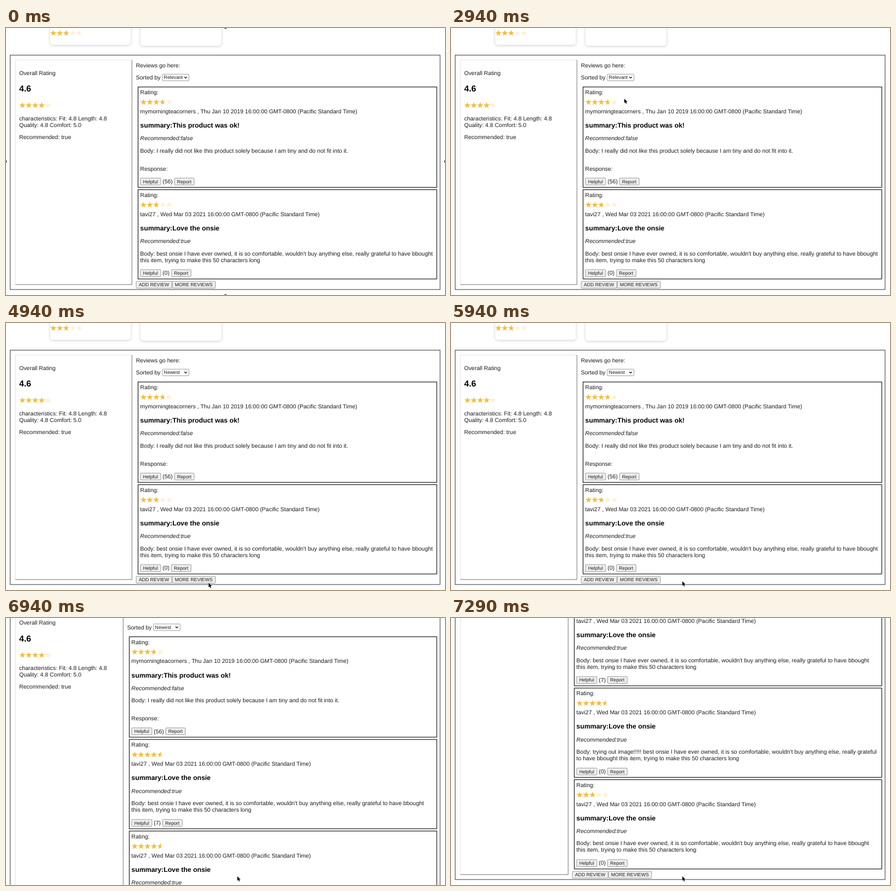
Write an HTML page that moves like this. It is 800x488 px and loops after 8000 ms.

```html
<!DOCTYPE html>
<html lang="en">
<head>
<meta charset="utf-8">
<style>
  html, body { margin: 0; width: 100%; height: 100%; overflow: hidden; background: #fff; }
  svg { display: block; font: 10.46px "Liberation Sans", Arial, sans-serif; fill: #1c1c1c; text-rendering: geometricPrecision; }
  .h2 { font-size: 15.72px; font-weight: bold; fill: #000; }
  .h3 { font-size: 12.25px; font-weight: bold; fill: #000; }
  .i { font-style: italic; }
  .ui { font-size: 8.73px; }
  .btn { fill: #efefef; stroke: #858585; stroke-width: .8; }
  .box { fill: none; stroke: #1c1c1c; stroke-width: 1.2; }
  .frame { fill: none; stroke: #333; stroke-width: 1; }
  .card { fill: #fff; filter: drop-shadow(0 1px 2.5px rgba(0, 0, 0, .2)); }
  .menu { fill: #f0f0f0; stroke: #c8c8c8; stroke-width: .6; filter: drop-shadow(0 2px 2px rgba(0, 0, 0, .25)); }
</style>
</head>
<body>
<svg id="stage" width="800" height="488" viewBox="0 0 800 488"></svg>
<script>
const stage = document.getElementById('stage');
const LOOP = 8000;
const LINE = 12, PARAGRAPH = 22.4, GAP = 4.2;   // vertical rhythm of the page
const STAR = 11.7, MENU_ROW = 15;

const POSTED = 'Wed Mar 03 2021 16:00:00 GMT-0800 (Pacific Standard Time)';
const PRAISE = 'best onsie I have ever owned, it is so comfortable, wouldn\'t buy anything else, really grateful';
const ENDING = 'this item, trying to make this 50 characters long';
const onsie = (stars, votes, body = [`Body: ${PRAISE} to have bbought`, ENDING]) =>
  ({ stars, votes, body, by: 'tavi27 , ' + POSTED, title: 'Love the onsie', recommended: true, height: 163.2 });

const first = {
  stars: .74, votes: 56, height: 183.5, recommended: false, title: 'This product was ok!',
  by: 'mymorningteacorners , Thu Jan 10 2019 16:00:00 GMT-0800 (Pacific Standard Time)',
  body: ['Body: I really did not like this product solely because I am tiny and do not fit into it.'],
  response: true
};
const last = onsie(.56, 0);
const fewReviews = [first, last];
const allReviews = [first, onsie(.92, 7),
  onsie(.92, 0, [`Body: trying out image!!!!! ${PRAISE}`, 'to have bbought ' + ENDING]), last];
const GROWTH = 2 * (last.height + GAP);   // two more reviews make the page this much taller

// Moves: start, end, then where they lead
const cursorMoves = [
  [1240, 1240, 302.5, 93.5], [1710, 2060, 300.5, 88.5], [2300, 2410, 305, 118], [2850, 3470, 489.5, 309.5],
  [3820, 4180, 491, 408], [4300, 4590, 374, 476], [4900, 5060, 345, 470.5], [5300, 5590, 421.5, 472]
];
const scrollMoves = [[0, 0, 0], [6710, 6710, 17.5], [6940, 6940, 73.5], [7000, 7290, GROWTH]];
const clicks = [[2060, 2240], [2760, 2850], [5060, 5240]];

const between = (t, a, b) => t >= a && t < b;

function follow(moves, t) {
  let at = moves[0].slice(2);
  for (const [start, end, ...to] of moves) {
    if (t < start) break;
    const u = Math.min(1, (t - start) / (end - start || 1)), ease = start === end ? 1 : u * u * (3 - 2 * u);
    at = at.map((v, i) => v + (to[i] - v) * ease);
  }
  return at;
}

const text = (x, y, s, cls = '', extra = '') => `<text x="${x}" y="${y}" class="${cls}" ${extra}>${s}</text>`;
const rect = (x, y, w, h, cls, extra = '') =>
  `<rect x="${x}" y="${y}" width="${w}" height="${h}" class="${cls}" ${extra}/>`;

function button(x, cy, w, label, fill = '#efefef') {
  return rect(x + .4, cy - 6.3, w - .8, 12.6, 'btn', `rx="1.3" style="fill:${fill}"`) + text(x + 5.1, cy + 3.1, label, 'ui');
}

const starPath = Array.from({ length: 50 }, (_, n) => {
  const k = n % 10, r = k % 2 ? 2.35 : 6, a = k * Math.PI / 5;
  const x = (Math.floor(n / 10) + .5) * STAR + r * Math.sin(a);
  return `${k ? 'L' : 'M'}${x.toFixed(2)} ${(.5 - r * Math.cos(a)).toFixed(2)}`;
}).join('');

function stars(x, cy, part) {
  const id = 'clip' + Math.round(part * 100);
  return `<g transform="translate(${x} ${cy})"><clipPath id="${id}">${rect(0, -8, 5 * STAR * part, 16, '')}</clipPath>
    <path d="${starPath}" fill="#fcf0d6"/><path d="${starPath}" fill="#f3bd3c" clip-path="url(#${id})"/></g>`;
}

function review(r, left, top) {
  const x = left + 4, cy = top + r.height - 10.7;
  const votes = `(${r.votes})`;
  const reportX = x + 37.5 + 5.8 * votes.length;
  const detail = top + 97.6, body = detail + PARAGRAPH;
  return rect(left, top, 785 - left, r.height, 'box') +
    text(x, top + 13.4, 'Rating:') + stars(x, top + 27.4, r.stars) +
    text(x, top + 48.1, r.by) +
    text(x, top + 74.2, 'summary:' + r.title, 'h3') +
    text(x, detail, 'Recommended:' + r.recommended, 'i') +
    r.body.map((line, i) => text(x, body + LINE * i, line)).join('') +
    (r.response ? text(x, body + PARAGRAPH + 10.3, 'Response:') : '') +
    button(x, cy, 37.7, 'Helpful') + text(x + 40.6, cy + 3.4, votes) +
    button(reportX + (votes.length < 4 ? 1.4 : 1.3), cy, 36.7, 'Report');
}

function summaryPanel(right, bottom) {
  const x = 24, traits = 168.8;
  return `<path d="M17 ${bottom}V58.5H${right}" fill="none" stroke="#e6e6e6" stroke-width="1.2"/>
    <path d="M17 ${bottom}H${right}V58.5" fill="none" stroke="#8c8c8c" stroke-width="1.2"/>` +
    text(x, 85.8, 'Overall Rating') + text(x, 116, '4.6', 'h2') + stars(x, 141, .83) +
    text(x, traits, 'characteristics: Fit: 4.8 Length: 4.8') + text(x, traits + LINE, 'Quality: 4.8 Comfort: 5.0') +
    text(x, traits + LINE + PARAGRAPH - .4, 'Recommended: true');
}

function page(t) {
  const loaded = t >= 6240, shift = loaded ? -16 : 0, grow = loaded ? GROWTH : 0;
  const x = 236.8 + shift, bottom = 469.2 + grow;
  let top = 107.8;
  const list = (loaded ? allReviews : fewReviews).map(r => {
    const out = review(r, 240.6 + shift, top);
    top += r.height + GAP;
    return out;
  }).join('');
  return rect(80.5, -20, 147, 50.7, 'card', 'rx="5"') + rect(245, -20, 147.5, 52.5, 'card', 'rx="5"') +
    stars(80.5, 9, .56) +
    rect(7.6, 49.6, 783.4, 428.4 + grow, 'frame') + summaryPanel(229.5 + shift, bottom - .4) +
    text(x, 71.6, 'Reviews go here:') + text(x, 71.6 + PARAGRAPH, 'Sorted by') +
    rect(x + 48, 84.4, 48.6, 12, 'btn', 'rx="1.3" style="fill:#fff"') +
    text(x + 50.8, 93.4, t < 3820 ? 'Relevant' : 'Newest', 'ui') +
    `<path d="M${x + 88.2} 89.2l2.3 2.4 2.3-2.4" fill="none" stroke="#111" stroke-width="1.3"/>` + list +
    button(x, bottom, 65.8, 'ADD REVIEW') +
    button(x + 65.8, bottom, 79.3, 'MORE REVIEWS', between(t, 5060, 5940) ? '#e5e5e5' : '#efefef');
}

function menu(t, pointerY) {
  if (!between(t, 2240, 2850)) return '';
  const active = Math.max(0, Math.floor((pointerY - 83) / MENU_ROW));
  return rect(274, 80, 67, 51, 'menu', 'rx="3.5"') +
    rect(277, 83 + MENU_ROW * active, 61, MENU_ROW, '', 'rx="2.5" fill="#3b82f6"') +
    ['Relevant', 'Helpful', 'Newest'].map((s, i) =>
      text(288, 93.4 + MENU_ROW * i, s, 'ui', i === active ? 'fill="#fff"' : '')).join('') +
    `<path d="M280 90.5l1.8 2.2 3-4.6" fill="none" stroke="${active ? '#111' : '#fff'}"/>`;
}

function pointer(t, x, y) {
  if (t < cursorMoves[0][0]) return '';
  const pressed = clicks.some(([a, b]) => between(t, a, b));
  return (pressed ? `<circle cx="${x}" cy="${y}" r="16.5" fill="#f5343c" fill-opacity=".6"/>` : '') +
    `<path transform="translate(${x} ${y})" d="M0 0V8.2L1.9 6.5 3.2 9.4 4.6 8.8 3.3 6H5.9Z"
      fill="#000" stroke="#fff" stroke-width=".9" paint-order="stroke"/>`;
}

function edgeMarks(t) {
  if (t >= 240) return '';
  return [[400, -1], [400, 489], [-1, 244], [801, 244]]
    .map(([x, y]) => `<circle cx="${x}" cy="${y}" r="2.3" fill="#000"/>`).join('');
}

let shown = '';
function frame() {
  const t = performance.now() % LOOP;
  const [x, y] = follow(cursorMoves, t), [scroll] = follow(scrollMoves, t);
  const scene = `<g transform="translate(0 ${-scroll})">${page(t)}</g>` + menu(t, y) + pointer(t, x, y) + edgeMarks(t);
  if (scene !== shown) stage.innerHTML = shown = scene;
  requestAnimationFrame(frame);
}
frame();
</script>
</body>
</html>
```
